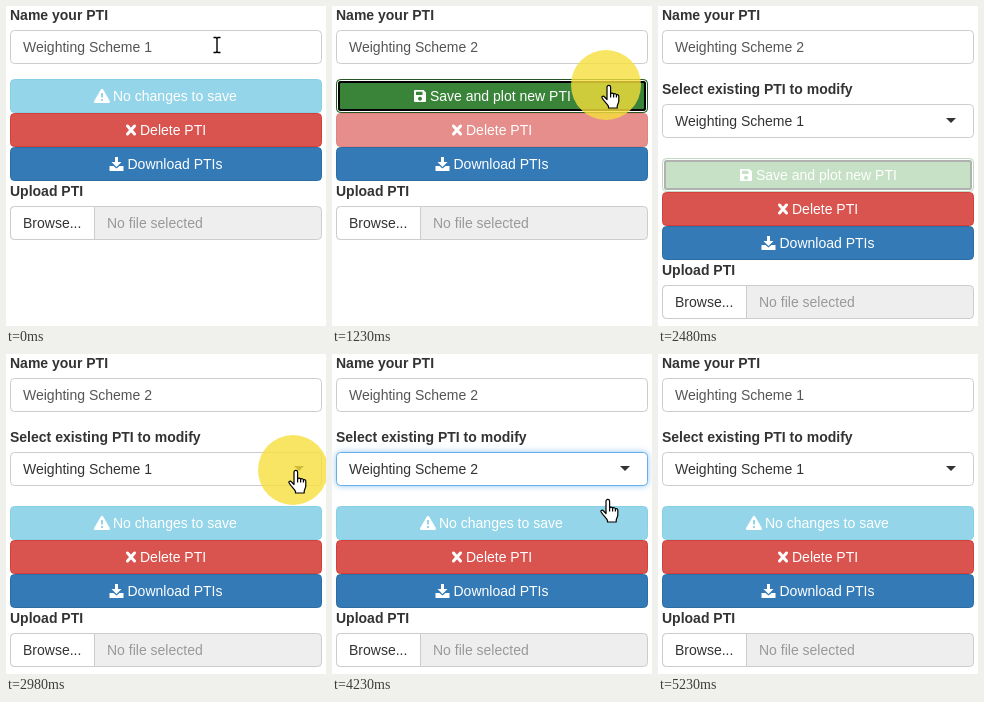
An HTML page that plays this animation: 320x320 px, repeating every 5.48 s.

```html
<!DOCTYPE html>
<html lang="en">
<head>
<meta charset="utf-8">
<title>Weighting scheme form</title>
<style>
  html, body { margin: 0; width: 100%; height: 100%; overflow: hidden; background: #fff; }
  svg { display: block; width: 320px; height: 320px; }
  text { font: 14px "Liberation Sans", Arial, sans-serif; fill: #333; }
  .label { font-weight: bold; }
  .field { fill: #fff; stroke: #ccc; }
  .focus { stroke: #66afe9; filter: drop-shadow(0 0 3px rgba(102, 175, 233, .7)); }
  .btn text, .icon { fill: #fff; }
  .muted { fill: #999; }
  .none { fill: #5bc0de; stroke: #46b8da; }
  .delete { fill: #d9534f; stroke: #d43f3a; }
  .download { fill: #337ab7; stroke: #2e6da4; }
  .idle { fill: #5cb85c; stroke: #4cae4c; }
  .hover { fill: #449d44; stroke: #398439; }
  .pressed { fill: #398439; stroke: #255625; }
  .line { fill: none; stroke: #000; }
  #menu > .panel { fill: #fff; stroke: #ccc; filter: drop-shadow(0 4px 5px rgba(0, 0, 0, .16)); }
</style>
</head>
<body>
<svg viewBox="0 0 320 320">
  <defs>
    <clipPath id="slide"><rect id="clip" width="320"/></clipPath>
  </defs>

  <text class="label" x="4" y="14">Name your PTI</text>
  <rect id="nameBox" class="field" x="4.5" y="24.5" width="311" height="33" rx="4"/>
  <text id="name" x="17" y="46" style="fill:#555"></text>
  <path id="nameCaret" class="line"/>

  <g id="existing" clip-path="url(#slide)">
    <text class="label" x="4" y="88">Select existing PTI to modify</text>
    <rect id="selectBox" class="field" x="4.5" y="98.5" width="311" height="33" rx="4"/>
    <text id="choice" x="17" y="120"></text>
    <path id="selectCaret" class="line" d="M147.5 107v16"/>
    <path id="arrow" fill="#333"/>
  </g>

  <g id="lower">
    <g id="none" class="btn" opacity=".65" transform="translate(0 73)">
      <rect class="none" x="4.5" y=".5" width="311" height="33" rx="4"/>
      <path class="icon" d="M94.7 10.8q1.3-2 2.6 0l6.5 11.3q.8 1.9-1.2 1.9H89.4q-2 0-1.2-1.9Z"/>
      <path d="M96 14v4.5m0 1.5v2" stroke="#5bc0de" stroke-width="2"/>
      <text x="107" y="22">No changes to save</text>
    </g>
    <g id="save" class="btn" transform="translate(0 73)">
      <rect id="saveBox" x="4.5" y=".5" width="311" height="33" rx="4"/>
      <g id="ring" fill="none">
        <rect x="5.5" y="1.5" width="309" height="31" rx="3" stroke="#fff"/>
        <rect x="7" y="3" width="306" height="28" rx="2" stroke="#000" stroke-width="2"/>
      </g>
      <path class="icon" fill-rule="evenodd" d="M83 11h8.5l2.5 2.5V22q0 1-1 1H83q-1 0-1-1V12q0-1 1-1Zm1 1.7v3.3h6.5v-3.3Zm4 5a2 2 0 1 0 .01 0Z"/>
      <text x="98" y="22">Save and plot new PTI</text>
    </g>
    <g id="delete" class="btn" transform="translate(0 107)">
      <rect class="delete" x="4.5" y=".5" width="311" height="33" rx="4"/>
      <path d="M121.5 13l7 8m0-8l-7 8" stroke="#fff" stroke-width="3" stroke-linecap="round"/>
      <text x="134" y="22">Delete PTI</text>
    </g>
    <g class="btn" transform="translate(0 141)">
      <rect class="download" x="4.5" y=".5" width="311" height="33" rx="4"/>
      <path class="icon" d="M109 10h3v5h3.5l-5 5-5-5h3.500ZM103.500 19h4l3 2.500 3-2.500h4v5h-14Z"/>
      <text x="121.500" y="22">Download PTIs</text>
    </g>
    <text class="label" x="4" y="190">Upload PTI</text>
    <rect x="4.5" y="200.5" width="311" height="33" rx="4" fill="#eee" stroke="#ccc"/>
    <path class="field" d="M88.500 200.500H8.500a4 4 0 0 0-4 4v25a4 4 0 0 0 4 4h80Z"/>
    <text x="17" y="222">Browse...</text>
    <text class="muted" x="101" y="222">No file selected</text>
  </g>

  <g id="menu">
    <path class="panel" d="M4.500 134.500h311v60q0 4-4 4h-303q-4 0-4-4Z"/>
    <rect id="active" x="5" width="310" height="26" fill="#f5f5f5"/>
    <text x="17" y="158">Weighting Scheme 1</text>
    <text x="17" y="184">Weighting Scheme 2</text>
  </g>

  <circle id="click" r="35" fill="#f5df3c" opacity=".8"/>
  <path id="beam" class="line" d="M-3.500-7.500h2.500l1 1 1-1h2.500M0-7V7M-3.500 7.500h2.500l1-1 1 1h2.500" stroke-width="1.400"/>
  <g id="hand" stroke="#000" stroke-width="1.200" stroke-linejoin="round">
    <path fill="#fff" d="M6 2.200a1.800 1.800 0 0 1 3.600 0V9a1.600 1.600 0 0 1 3 .3 1.600 1.600 0 0 1 2.800.7 1.500 1.500 0 0 1 2.400 1.200V16c0 2-1.600 3.500-1.600 5.500V23H7.500v-1.500C6.500 19 3 16.500 1 12.800.5 11.300 2.500 10.600 3.600 12L6 14.500Z"/>
    <path fill="none" d="M9.600 9v3.500m3-3v3m2.800-2.500v2.500"/>
  </g>
</svg>
<script>
  const LOOP = 5480;
  const $ = id => document.getElementById(id);

  // Each step lists only what changes at that time.
  const steps = [
    [0, { name: 'Weighting Scheme 1', choice: 1, shift: 0, save: '', fade: 1, ring: false,
          del: 1, focus: false, open: false, glow: false, option: 1,
          beam: [211, 39], hand: null, click: null }],
    [230, { beam: [180, 41] }],
    [480, { beam: [155, 41], click: [155, 41], focus: true }],
    [730, { name: 'Weighting Scheme ', click: null, save: 'idle', del: .65 }],
    [980, { name: 'Weighting Scheme 2', beam: [215, 46] }],
    [1230, { focus: false, beam: null, hand: [269, 79], click: [274, 79], save: 'pressed', ring: true }],
    [1480, { click: null, save: 'hover', del: 1 }],
    [1730, { hand: null }],
    [1980, { shift: 53 }],
    [2230, { shift: 79 }],
    [2480, { fade: .3 }],
    [2730, { save: '', ring: false }],
    [2980, { hand: [282, 116], click: [287, 116] }],
    [3230, { open: true, glow: true, click: null, hand: [282, 120] }],
    [3480, { hand: [270, 146] }],
    [3730, { hand: [250, 156] }],
    [3980, { hand: [245, 180], click: [250, 180], option: 2 }],
    [4230, { open: false, click: null, choice: 2, hand: [268, 145] }],
    [4480, { open: true, hand: [284, 115], click: [289, 115] }],
    [4730, { click: null, hand: [283, 146], option: 1 }],
    [4980, { open: false, glow: false, choice: 1, click: [288, 148] }],
    [5230, { name: 'Weighting Scheme 1', click: null, hand: null }]
  ];
  let last = {};
  const scenes = steps.map(([at, change]) => ({ at, ...(last = { ...last, ...change }) }));

  const show = (id, on) => { $(id).style.display = on ? '' : 'none'; };
  const set = (id, attr, value) => $(id).setAttribute(attr, value);
  const place = (id, pos) => {
    show(id, pos);
    if (pos) set(id, 'transform', `translate(${pos})`);
  };

  function draw(s) {
    $('name').textContent = s.name;
    $('choice').textContent = 'Weighting Scheme ' + s.choice;
    set('nameBox', 'class', s.focus ? 'field focus' : 'field');
    show('nameCaret', s.focus);
    set('nameCaret', 'd', `M${s.name.endsWith(' ') ? 139.5 : 147.5} 33v16`);

    show('existing', s.shift);
    set('clip', 'height', s.shift < 79 ? 64 + s.shift : 320);
    set('selectBox', 'class', s.glow ? 'field focus' : 'field');
    show('selectCaret', s.open && s.choice === 2);
    set('arrow', 'd', s.open ? 'M288 116h10l-5-5Z' : 'M288 112h10l-5 5Z');

    set('lower', 'transform', `translate(0 ${s.shift})`);
    show('none', !s.save);
    show('save', s.save);
    set('save', 'opacity', s.fade);
    set('saveBox', 'class', s.save);
    show('ring', s.ring);
    set('delete', 'opacity', s.del);

    show('menu', s.open);
    set('active', 'y', s.option === 1 ? 140 : 166);
    for (const id of ['click', 'beam', 'hand']) place(id, s[id]);
  }

  let current;
  function tick() {
    const t = performance.now() % LOOP;
    const scene = scenes.findLast(s => s.at <= t);
    if (scene !== current) draw(current = scene);
    requestAnimationFrame(tick);
  }
  tick();
</script>
</body>
</html>
```
